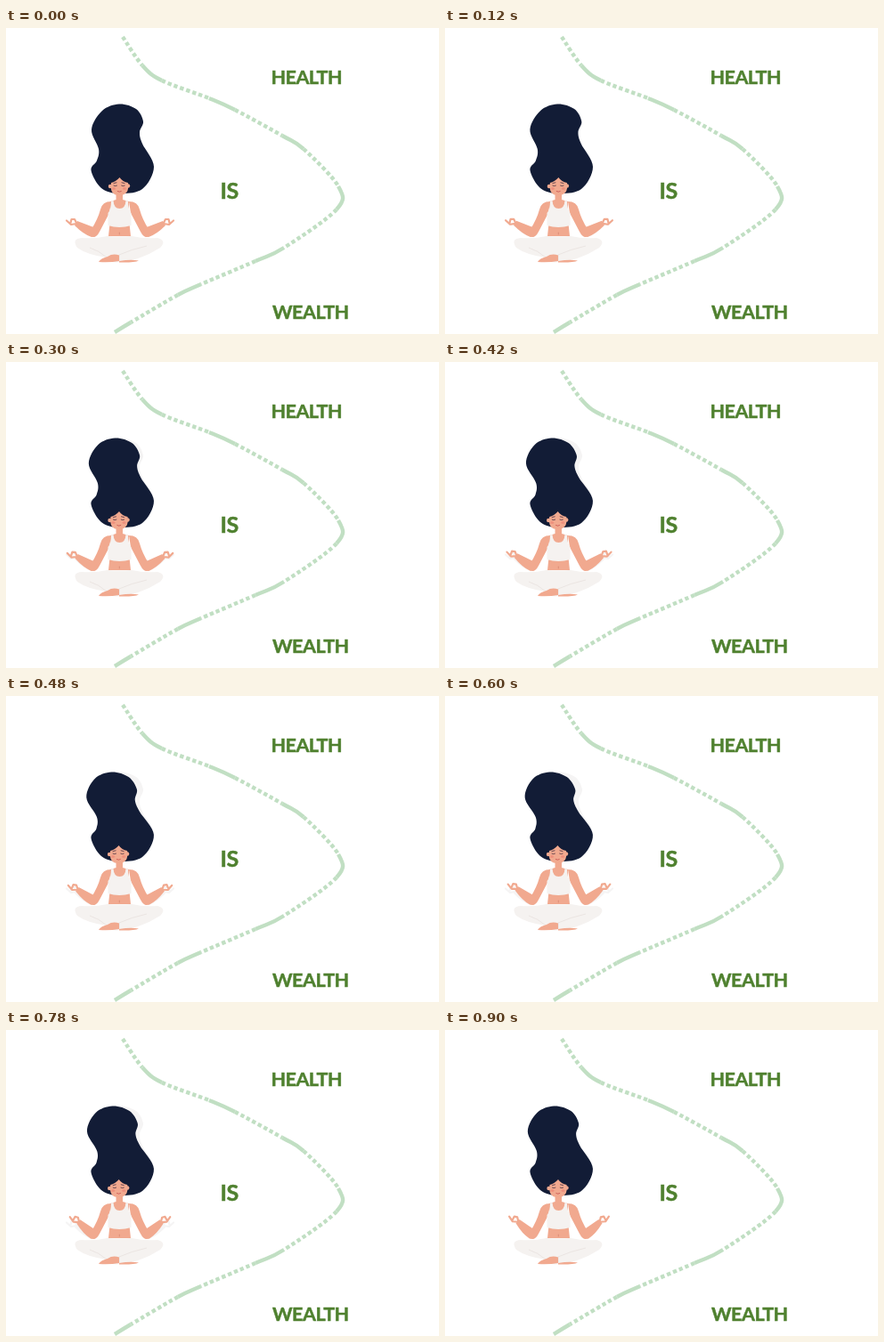
Write an HTML page that moves like this. It is 486 px wide and 344 px high and loops after 0.96 s.

```html
<!DOCTYPE html>
<html lang="en">
<head>
<meta charset="utf-8">
<title>Health is wealth</title>
<style>
  html, body { margin: 0; width: 100%; height: 100%; overflow: hidden; background: #fff; }
  svg { display: block; width: 100%; height: 100%; }
  text { font: 700 21.5px Lato, sans-serif; letter-spacing: -.5px; fill: #4f812f; stroke: #4f812f; stroke-width: .5; }
  #trail { fill: none; stroke: #c1dfc3; stroke-width: 4.4; }
  .dotted { stroke-dasharray: 4.4 2.9; }
  .skin { fill: #f1a98f; }
  .cloth { fill: #f5f2f0; }
  .fold { fill: none; stroke: #e6dfdc; stroke-width: .7; }
  .face { fill: none; stroke: #493040; stroke-width: .8; stroke-linecap: round; }
  .hand { fill: none; stroke: currentColor; stroke-width: 2.2; stroke-linecap: round; stroke-linejoin: round; }
</style>
</head>
<body>
<svg viewBox="0 0 486 344">
  <defs>
    <g id="forearm">
      <path fill="currentColor" d="M101 225L80 217L77 222Q87 232 96 235Q104 235 101 225Z"/>
      <path class="hand" d="M79 220L73 221L68 216.500M79 219L77 215L73.500 215L72.500 219"/>
    </g>
    <path id="upperarm" class="skin" d="M118 195Q108 195 106 204Q103 215 96 226Q93 234 98 235Q102 235 105 229L116 208Z"/>
  </defs>

  <g id="trail"></g>

  <text x="297.500" y="62.600">HEALTH</text>
  <text x="240.500" y="192" style="font-size:25px">IS</text>
  <text x="299" y="327">WEALTH</text>

  <g id="echo" color="#f5f4f4">
    <path class="hair" fill="currentColor"/>
    <use href="#forearm"/>
    <use href="#forearm" transform="translate(256) scale(-1 1)"/>
  </g>

  <path id="hair" class="hair" fill="#121c36"/>

  <path class="skin" d="M123.500 184H131V193L138 195V215L140 234H115L117 215V195L123.500 193Z"/>
  <g color="#f1a98f">
    <use href="#upperarm"/>
    <use href="#forearm" class="lift"/>
    <g transform="translate(256) scale(-1 1)">
      <use href="#upperarm"/>
      <use href="#forearm" class="lift"/>
    </g>
  </g>
  <path class="cloth" d="M118 194.500L120.500 194Q121 203 127.500 203Q134 203 134.500 194L137 194.500Q137 204 140.500 208V222Q127 226 114.500 222V208Q118 204 118 194.500Z"/>
  <path class="face" style="stroke:#d98773" d="M127.300 230V232"/>

  <path class="cloth" d="M114 234Q127 235 141 234Q155 237 170 236Q181 239 173 247Q150 262 124 263.500L105 262Q108 259 113 258Q91 255 80 247Q73 237 85 236Q100 237 114 234Z"/>
  <path class="fold" d="M113 258Q104 250 94 247M158 245Q140 249 127 255V262"/>
  <path class="skin" d="M104 263Q106 259 114 257Q120 253 127 255.500V262Q116 264 104 263ZM127 262Q140 260 149 261.500Q144 264 127 263.500Z"/>

  <g id="head">
    <circle class="skin" cx="117" cy="178" r="2.200"/>
    <circle class="skin" cx="137" cy="177.500" r="2.200"/>
    <path class="skin" d="M127.500 168Q123 173 118 174Q116 188 127 188Q139 188 137 174Q131 173 127.500 168Z"/>
    <g fill="#ec7d70" opacity=".55">
      <ellipse cx="121" cy="180.500" rx="2" ry="1.500"/>
      <ellipse cx="133" cy="180.500" rx="2" ry="1.500"/>
    </g>
    <path class="face" d="M121 177.200q1.700 1 3.400 0M129.700 177.200q1.700 1 3.400 0M121 174.500l3-.7M130 173.800l3 .7"/>
    <path class="face" style="stroke:#c74e4c" d="M125.300 183.600q2 1.300 4 0"/>
  </g>
</svg>

<script>
const LOOP = 960, STEP = 60;
const $ = id => document.getElementById(id);

// Cubic pieces of a smooth curve through the points.
function spline(pts, closed) {
  const n = pts.length;
  const at = i => pts[closed ? (i + n) % n : Math.min(Math.max(i, 0), n - 1)];
  const handle = (i, k) => at(i).map((v, j) => v + k * (at(i + 1)[j] - at(i - 1)[j]) / 6);
  return Array.from({ length: closed ? n : n - 1 }, (_, i) => ({
    from: at(i),
    curve: `C${handle(i, 1)} ${handle(i + 1, -1)} ${at(i + 1)}`
  }));
}

// The trail changes between dotted and solid at each knot.
const knots = [
  [131, 10], [153, 42], [175, 59], [228, 79], [257, 92], [310, 121], [334, 136], [373, 178],
  [371, 204], [312, 247], [280, 262], [219, 288], [193, 300], [140, 331], [122, 342]
];
$('trail').innerHTML = spline(knots).map(({ from, curve }, i) =>
  `<path d="M${from}${curve}" class="${i % 2 ? 'solid' : 'dotted'}"/>`).join('');

const outline = [
  [127, 85.5], [108, 93], [96, 114], [104, 136], [102, 149], [95.5, 160], [107, 180], [127, 186],
  [153, 181], [166, 156], [153, 130], [150, 117], [154, 105], [146, 91]
];

// The hair leans more towards its top and is still below y = 160.
function hairPath(lean) {
  const pts = outline.map(([x, y]) => {
    const u = Math.max(0, (160 - y) / 75);
    return [x - lean * u * u * (3 - 2 * u), y];
  });
  return 'M' + pts[0] + spline(pts, true).map(s => s.curve).join('') + 'Z';
}

const swing = (t, period) => (1 - Math.cos(2 * Math.PI * t / period)) / 2;
const lifts = document.querySelectorAll('.lift');

function draw(now) {
  const t = Math.floor(now % LOOP / STEP) * STEP;
  const sway = swing(t, 1200);
  const raise = swing(t, 1920);
  $('hair').setAttribute('d', hairPath(9.5 * sway));
  $('head').setAttribute('transform', `translate(${-sway})`);
  lifts.forEach(el => el.setAttribute('transform', `rotate(${14 * raise} 98 230)`));
  $('echo').style.display = t > 0 && t < 900 ? '' : 'none';
}

document.querySelector('#echo .hair').setAttribute('d', hairPath(0));
const start = performance.now();
function tick() {
  draw(performance.now() - start);
  requestAnimationFrame(tick);
}
tick();
</script>
</body>
</html>
```
